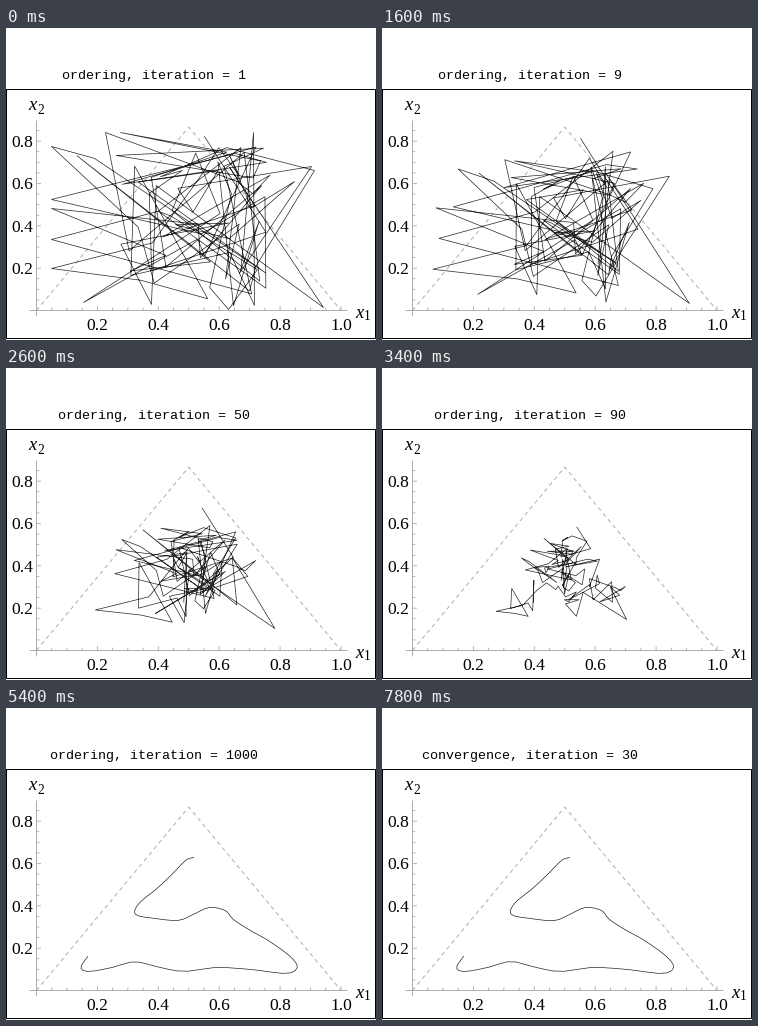
Animation of 370x312 px, one loop 8 s. Source, as a matplotlib script:

```python
import numpy as np
import matplotlib.pyplot as plt
from matplotlib.animation import FuncAnimation

plt.rcParams["path.snap"] = False

W, H, DPI = 370, 312, 100
PT = 72 / DPI  # points per pixel
N = 100        # neurons in the chain
CENTER = np.array([180, 215])

# Outermost neurons of the scattered start, spaced evenly along the chain
OUTER = [(198, 108), (308, 142), (45, 180), (114, 104), (45, 211), (45, 118),
         (305, 138), (222, 281), (45, 171), (77, 274), (99, 104), (317, 279),
         (288, 153), (45, 240), (247, 104)]

# Key points of the chain after each phase
ORDERED = [(204, 144), (187, 147), (182, 157), (179, 168), (172, 181),
           (155, 190), (137, 203), (155, 205), (178, 202), (206, 202),
           (232, 217), (265, 243), (278, 257), (262, 263), (220, 261),
           (180, 258), (150, 261), (115, 264), (95, 263), (86, 256), (93, 247)]
CONVERGED = [(187, 149), (179, 152), (165, 166), (150, 180), (132, 195),
             (129, 206), (148, 210), (172, 212), (187, 206), (203, 199),
             (219, 202), (227, 211), (244, 222), (262, 232), (284, 248),
             (291, 259), (280, 265), (245, 261), (210, 259), (177, 263),
             (150, 258), (128, 253), (105, 259), (82, 263), (74, 259),
             (81, 248)]


def chain(points, bends):
    """Spread N neurons along a smooth curve, its two bends at fixed neurons."""
    p = np.array(points, float)
    last = len(p) - 1
    u = np.interp(np.arange(N), [0, 38, 73, N - 1], [0, *bends, last])
    i = np.minimum(u.astype(int), last - 1)
    f = (u - i)[:, None]
    m = np.gradient(p, axis=0)
    return (p[i] * (1 + 2 * f) * (1 - f) ** 2 + m[i] * f * (1 - f) ** 2
            + p[i + 1] * f ** 2 * (3 - 2 * f) + m[i + 1] * f ** 2 * (f - 1))


rng = np.random.default_rng(12)
index = np.arange(N)[:, None]
start = np.column_stack([rng.triangular(60, 230, 285, N),
                         rng.uniform(118, 278, N)])
start[::7] = OUTER
rough = rng.normal(0, 2.2, (N, 2)) * np.clip(1.2 - index / 38, 0, 1)
ordered = chain(ORDERED, (6, 12)) + rough
converged = chain(CONVERGED, (5, 15))
pull = 0.3 * np.sin(0.21 * index) ** 2


def positions(n):
    """Scatter shrinks to the centre while the ordered shape grows out."""
    t = n - 1
    scatter = 0.9 * np.exp(-(t / 65) ** 1.4) + 0.1 * np.exp(-t / 130)
    scatter = scatter * (1 - pull * (1 - np.exp(-t / 4)))
    grow = min(1, (1 - np.exp(-t / 160)) / (1 - np.exp(-499 / 160)))
    settle = 1 - np.exp(-max(0, n - 500) / 130)
    shape = ordered + settle * (converged - ordered)
    return CENTER + scatter * (start - CENTER) + grow * (shape - CENTER)


STEPS = ([("ordering", n) for n in
          [*range(1, 11), *range(20, 101, 10), *range(200, 1001, 100)]]
         + [("convergence", n) for n in [*range(1, 11), 20, 30]])


def px(x):
    return 30.5 + 304.5 * x


def py(y):
    return 282.5 - 211.7 * y


fig = plt.figure(figsize=(W / DPI, H / DPI), dpi=DPI, facecolor="white")
ax = fig.add_axes([0, 0, 1, 1])
ax.set_xlim(0, W)
ax.set_ylim(H, 0)
ax.axis("off")


def line(xs, ys, color, width=1.0, **kw):
    return ax.plot(xs, ys, color=color, lw=width * PT, **kw)[0]


def label(x, y, text, size=17.5, ha="center", family="Liberation Serif", **kw):
    return ax.text(x, y, text, fontsize=size * PT, ha=ha, va="baseline",
                   family=family, **kw)


GRAY = "0.65"
line([0.5, 369.5, 369.5, 0.5, 0.5], [61.5, 61.5, 310.5, 310.5, 61.5], "black",
     solid_joinstyle="miter", solid_capstyle="projecting")
line([px(0), px(0.5), px(1)], [py(0), py(0.866), py(0)], GRAY, 0.9,
     dashes=(4.5, 4), dash_capstyle="butt")
line([24, 341], [282.5, 282.5], GRAY, 0.9)
line([30.5, 30.5], [93, 288], GRAY, 0.9)

for k in range(1, 21):
    size = 4 if k % 4 == 0 else 2.5
    v = k / 20
    line([px(v)] * 2, [282.5, 282.5 - size], GRAY, 0.8)
    if k % 4 == 0:
        label(px(v), 302, f"{v:.1f}")
    if k < 18:
        line([30.5, 30.5 + size], [py(v)] * 2, GRAY, 0.8)
        if k % 4 == 0:
            label(27.5, py(v) + 6, f"{v:.1f}", ha="right")

for x, y, sub in [(22.5, 82.5, "2"), (349.5, 289.5, "1")]:
    label(x, y, "x", 18.5, "left", style="italic")
    label(x + 8.5, y + 3, sub, 13.5, "left")

title = label(148, 51.5, "", 13.33, family="Liberation Mono")
path = line([], [], "0.15", 0.7, solid_joinstyle="round")


def update(frame):
    phase, n = STEPS[frame]
    title.set_text(f"{phase}, iteration = {n}")
    pts = positions(n if phase == "ordering" else 1000 + 60 * n)
    path.set_data(pts[:, 0] + 0.5, pts[:, 1] + 0.5)
    return title, path


anim = FuncAnimation(fig, update, frames=len(STEPS), interval=200, repeat=True)
plt.show()
```
